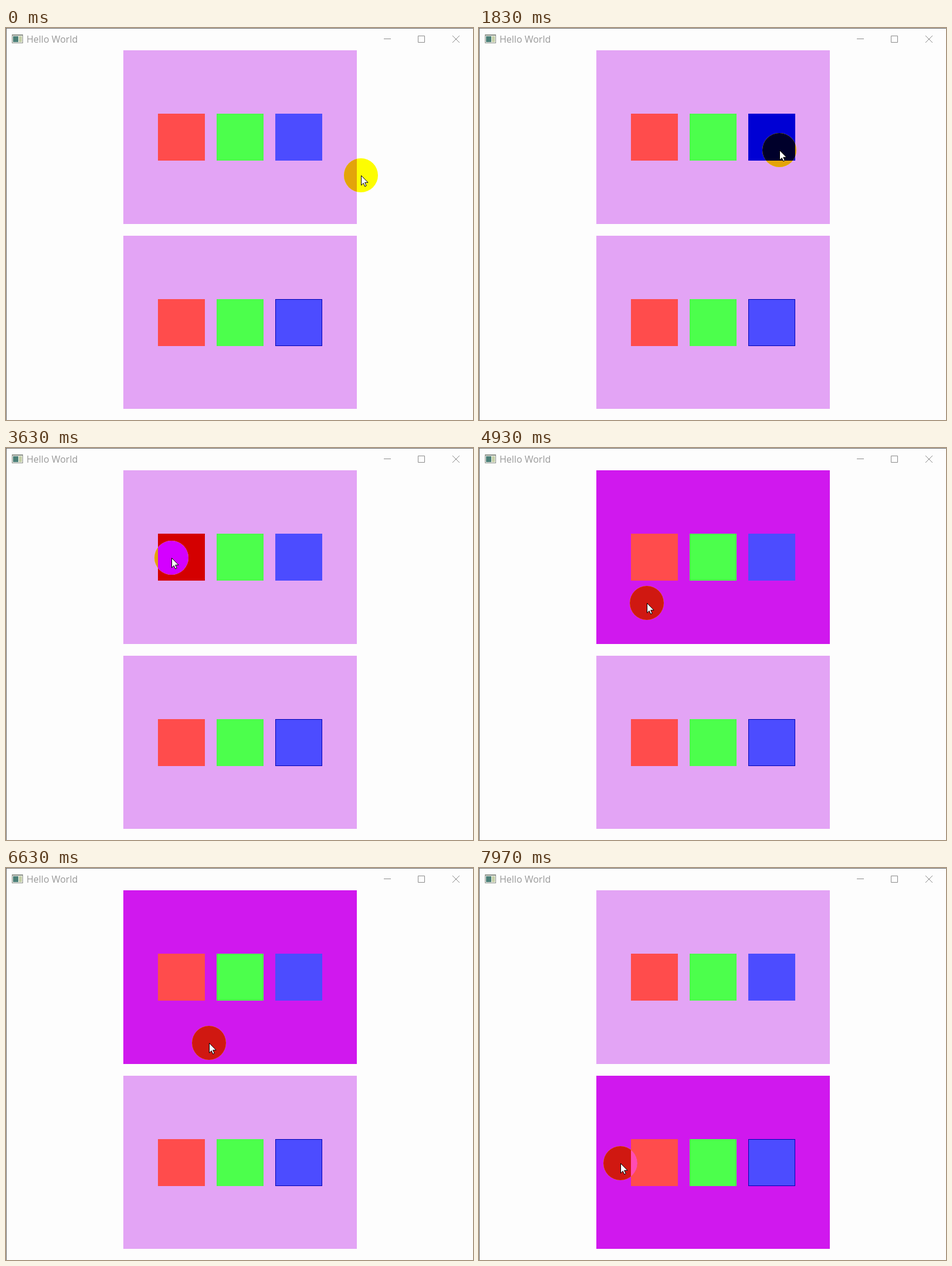
These frames come from a looping animation (796x668 px, 8 s). An HTML page with a canvas:

```html
<!DOCTYPE html>
<html lang="en">
<head>
<meta charset="utf-8">
<title>Hello World</title>
<style>
  html, body { margin: 0; width: 796px; height: 668px; overflow: hidden; background: #fdfdfd; }
  body { position: relative; }
  canvas { display: block; }
  #title {
    position: absolute; left: 35px; top: 8px;
    font: 16px/22px "Open Sans", "Noto Sans", sans-serif;
    color: #999; white-space: nowrap;
  }
</style>
</head>
<body>
<canvas id="stage" width="796" height="668"></canvas>
<div id="title">Hello World</div>
<script>
const stage = document.getElementById('stage');
const ctx = stage.getContext('2d');
const { width: W, height: H } = stage;
const LOOP = 8000, RADIUS = 29, SIDE = 80, GAP = 20;
const PAPER = [253, 253, 253];
const PANEL = { idle: [227, 164, 245], hover: [208, 24, 238] };

// Pointer stops; hold is the rest before moving on
const STOPS = [
  { t: 0, x: 605, y: 251, hold: 500 },
  { t: 700, x: 590, y: 246, hold: 430 },
  { t: 1830, x: 512, y: 208, hold: 140 },
  { t: 3630, x: 282, y: 187 },
  { t: 3900, x: 245, y: 190 },
  { t: 4200, x: 275, y: 195 },
  { t: 4930, x: 286, y: 264 },
  { t: 5270, x: 330, y: 268, hold: 160 },
  { t: 5700, x: 397, y: 218 },
  { t: 5830, x: 399, y: 205, hold: 140 },
  { t: 6770, x: 335, y: 318 },
  { t: 7370, x: 286, y: 430 },
  { t: 7670, x: 152, y: 475 },
  { t: 7970, x: 241, y: 503 }
];

function pointerAt(t) {
  const from = STOPS.findLast(s => s.t <= t);
  const to = STOPS.find(s => s.t > t) || from;
  const leave = from.t + (from.hold || 0);
  const p = Math.max(0, t - leave) / (to.t - leave || 1);
  const between = axis => Math.round(from[axis] + (to[axis] - from[axis]) * p);
  return { x: between('x'), y: between('y') };
}

// A panel with a red, a green and a blue square
function panel(y, h, outlined) {
  const square = i => ({
    x: 259 + i * (SIDE + GAP), y: y + 108, w: SIDE, h: SIDE,
    idle: [0, 1, 2].map(c => c === i ? 255 : 76),
    hover: [0, 1, 2].map(c => c === i ? 212 : 0),
    edge: outlined && i === 2 && [0, 0, 180]
  });
  return [{ x: 200, y, w: 398, h, ...PANEL }, ...[0, 1, 2].map(square)];
}
const areas = [...panel(38, 296, false), ...panel(354, 295, true)];

const plain = c => `rgb(${c})`;
// The pointer highlight inverts the blue channel
const lit = ([r, g, b]) => plain([r, g, 255 - b]);

function box(color, x, y, w, h) {
  ctx.fillStyle = color;
  ctx.fillRect(x, y, w, h);
}

function paintAreas(active, tint) {
  box(tint(PAPER), 0, 0, W, H);
  for (const a of areas) {
    const face = a === active ? a.hover : a.idle;
    box(tint(a.edge || face), a.x, a.y, a.w, a.h);
    if (a.edge) box(tint(face), a.x + 1, a.y + 1, a.w - 2, a.h - 2);
  }
}

function paintWindow() {
  box('#666', 0, 0, W, 1);
  box('#666', 0, 0, 1, H);

  // App icon
  box('#8a9088', 10, 11, 19, 15);
  box('#f4f4f0', 11, 13, 17, 12);
  box('#4c8078', 12, 14, 9, 10);
  box('#c4d0a8', 22, 14, 5, 10);

  ctx.strokeStyle = '#8c8c8c';
  ctx.lineWidth = 1;
  ctx.stroke(new Path2D('M644 18.5h12M702.5 13.5h11v11h-11zM761 13l12 12m0-12l-12 12'));
}

const arrow = new Path2D('M.5.5V17L4.2 13.4 6.7 19 9.2 17.9 6.7 12.3H12Z');

function draw(t) {
  const { x, y } = pointerAt(t);
  const active = areas.findLast(a =>
    x >= a.x && x < a.x + a.w && y >= a.y && y < a.y + a.h);

  paintAreas(active, plain);
  paintWindow();

  ctx.save();
  ctx.beginPath();
  ctx.arc(x, y, RADIUS, 0, Math.PI * 2);
  ctx.clip();
  paintAreas(active, lit);
  ctx.translate(x, y);
  ctx.fillStyle = '#fff';
  ctx.strokeStyle = '#000';
  ctx.fill(arrow);
  ctx.stroke(arrow);
  ctx.restore();
}

const start = performance.now();
function tick() {
  draw((performance.now() - start) % LOOP);
  requestAnimationFrame(tick);
}
tick();
</script>
</body>
</html>
```
